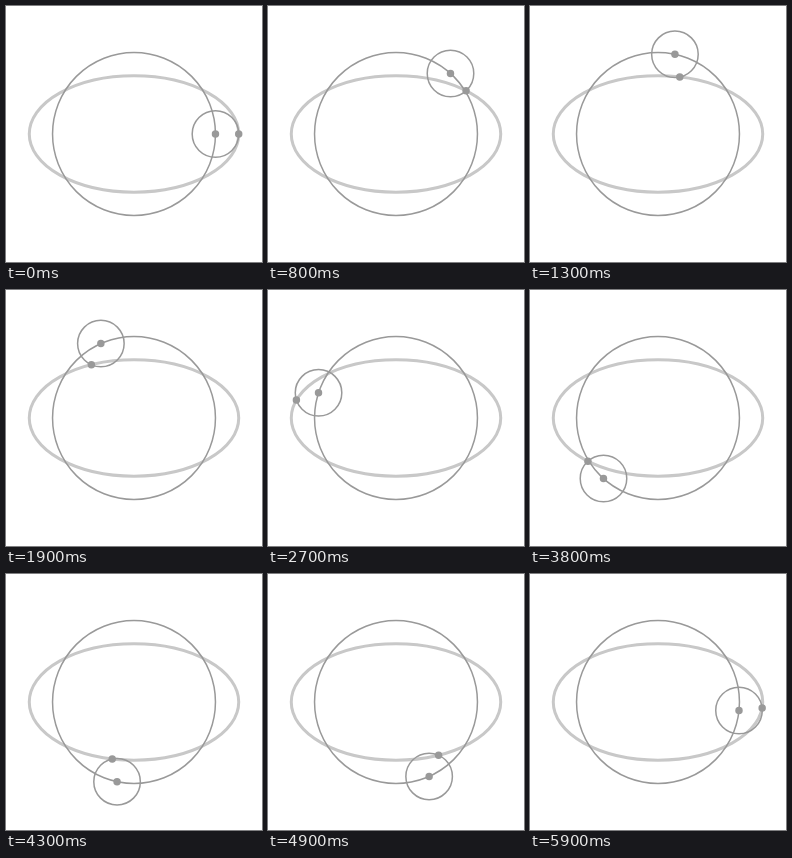
An HTML page with a canvas that plays this animation: 256x256 px, repeating every 6 s.

```html
<!DOCTYPE html>
<html lang="en">
<head>
<meta charset="utf-8">
<title>Ellipse from an epicycle</title>
<style>
  html, body { margin: 0; width: 100%; height: 100%; overflow: hidden; background: #fff; }
  canvas { display: block; width: 256px; height: 256px; }
</style>
</head>
<body>
<canvas id="stage"></canvas>
<script>
const SIZE = 256, CENTER = SIZE / 2, UNIT = SIZE / 11;
const LOOP = 6000, STEP = 100;
const DEFERENT = 3.5 * UNIT, EPICYCLE = UNIT, DOT = 0.16 * UNIT;
const GRAY = '#999', LIGHT = '#c8c8c8';

const canvas = document.getElementById('stage');
const ctx = canvas.getContext('2d');
const ratio = window.devicePixelRatio || 1;
canvas.width = canvas.height = Math.round(SIZE * ratio);
ctx.scale(canvas.width / SIZE, canvas.height / SIZE);

function outline(x, y, rx, ry, color, width) {
  ctx.beginPath();
  ctx.ellipse(x, y, rx, ry, 0, 0, 2 * Math.PI);
  ctx.strokeStyle = color;
  ctx.lineWidth = width;
  ctx.stroke();
}

function dot(x, y) {
  ctx.beginPath();
  ctx.arc(x, y, DOT, 0, 2 * Math.PI);
  ctx.fillStyle = GRAY;
  ctx.fill();
}

function draw(time) {
  const angle = 2 * Math.PI * Math.floor(time % LOOP / STEP) * STEP / LOOP;
  const cos = Math.cos(angle), sin = Math.sin(angle);
  const x = CENTER + DEFERENT * cos;
  const y = CENTER - DEFERENT * sin;

  ctx.fillStyle = '#fff';
  ctx.fillRect(0, 0, SIZE, SIZE);
  outline(CENTER, CENTER, DEFERENT + EPICYCLE, DEFERENT - EPICYCLE, LIGHT, 3);
  outline(CENTER, CENTER, DEFERENT, DEFERENT, GRAY, 1.5);
  outline(x, y, EPICYCLE, EPICYCLE, GRAY, 1.5);
  dot(x, y);
  // The epicycle turns opposite to the deferent, so its point traces the ellipse.
  dot(x + EPICYCLE * cos, y + EPICYCLE * sin);
}

const start = performance.now();
function tick() {
  draw(performance.now() - start);
  requestAnimationFrame(tick);
}
tick();
</script>
</body>
</html>
```
